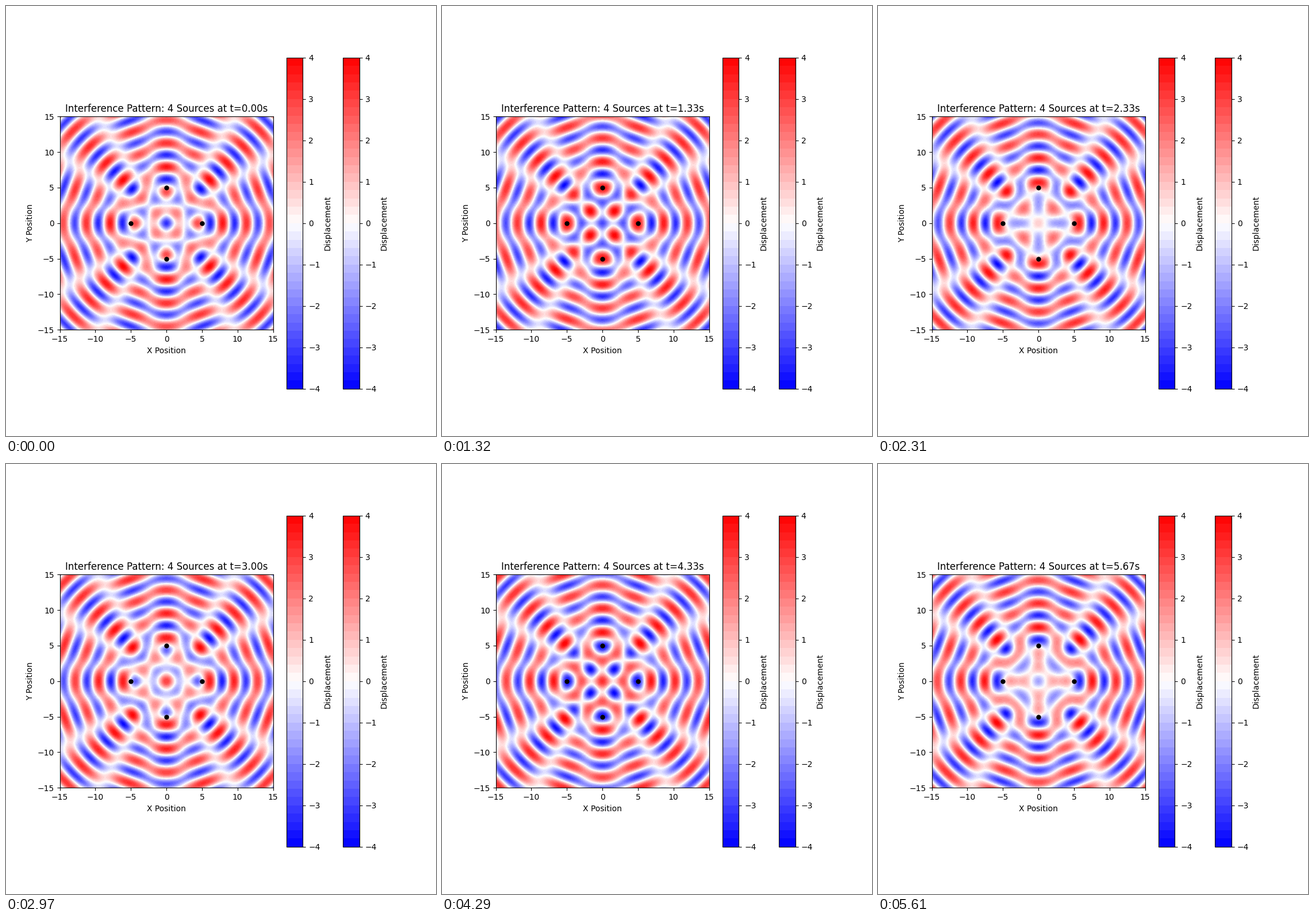
These frames come from a looping animation (748 px wide and 748 px high, 5940 ms). A matplotlib script:

```python
import numpy as np
import matplotlib.pyplot as plt
from matplotlib.animation import FuncAnimation

FRAMES = 18
INTERVAL = 330
TIME_STEP = 1 / 3
WAVE_NUMBER = 2.0
ANGULAR_FREQ = 1.0
SOURCES = [(5, 0), (0, 5), (-5, 0), (0, -5)]
LEVELS = np.linspace(-4, 4, 41)

axis = np.linspace(-15, 15, 300)
X, Y = np.meshgrid(axis, axis)
DISTANCES = [np.hypot(X - sx, Y - sy) for sx, sy in SOURCES]

plt.rcParams["font.family"] = "DejaVu Sans"
fig, ax = plt.subplots(figsize=(7.48, 7.48), dpi=100)
contours = None


def displacement(t):
    return sum(np.cos(WAVE_NUMBER * r - ANGULAR_FREQ * t) for r in DISTANCES)


def draw_field(t):
    global contours
    if contours is not None:
        contours.remove()
    contours = ax.contourf(X, Y, displacement(t), levels=LEVELS,
                           cmap="bwr", extend="neither")
    ax.set_title(f"Interference Pattern: {len(SOURCES)} Sources at t={t:.2f}s")


def update(frame):
    draw_field(frame * TIME_STEP)
    return []


draw_field(0)
ax.plot(*zip(*SOURCES), "ko", markersize=5)
ax.set(xlim=(-15, 15), ylim=(-15, 15), aspect="equal",
       xlabel="X Position", ylabel="Y Position")
for _ in range(2):
    fig.colorbar(contours, ax=ax, label="Displacement")

anim = FuncAnimation(fig, update, frames=FRAMES, interval=INTERVAL,
                     init_func=lambda: update(0), repeat=True, repeat_delay=0)
plt.show()
```
